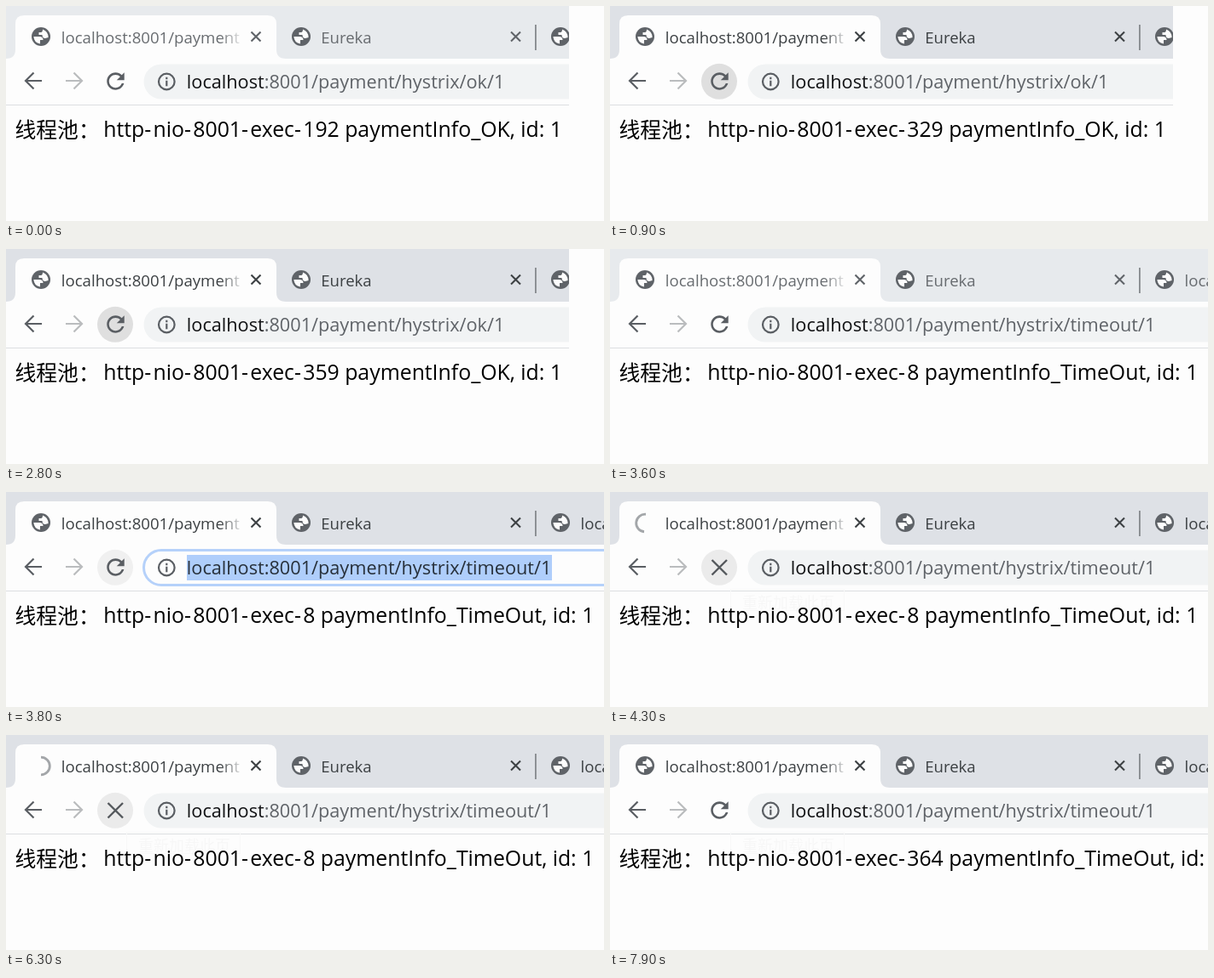
An HTML page that plays this animation: 701 by 253 pixels, repeating every 8000 ms.

```html
<!DOCTYPE html>
<html lang="zh-CN">
<head>
<meta charset="utf-8">
<title>Thread pool demo</title>
<style>
  html, body { margin: 0; width: 100%; height: 100%; overflow: hidden; background: #fdfdfd; }
  svg { display: block; width: 701px; height: 253px; }
  text { font-family: "Open Sans", "Noto Sans", sans-serif; white-space: pre; }
  .tab { font-size: 18.6px; }
  .url { font-size: 21.7px; }
  .body { font-size: 24.8px; fill: #000; }
  .cjk { font-family: "Noto Sans CJK SC", "Noto Sans CJK", sans-serif; }
  .dash { letter-spacing: 2.3px; }
  .line { fill: none; stroke: #5a5e63; stroke-width: 2.2; }
</style>
</head>
<body>
<svg viewBox="0 0 701 253">
  <defs>
    <g id="globe">
      <circle r="11" fill="#5f6368"/>
      <path fill="#fdfdfd" d="M-8.6 0H-2Q2.500 0 2.500 4H-1V8.500Q-8 7.500 -8.600 0ZM2-8.400Q8.400-6 8.600 1L5 2Q1.500 2 1.500-2H-2.500V-5H0Q2-5 2-8.400Z"/>
    </g>
    <path id="close" fill="none" stroke-width="2.1" d="M-5.500-5.500 5.500 5.500M5.500-5.500-5.500 5.500"/>
    <linearGradient id="fade">
      <stop offset="0" stop-color="#fdfdfd" stop-opacity="0"/>
      <stop offset="1" stop-color="#fdfdfd"/>
    </linearGradient>
  </defs>

  <rect width="701" height="253" fill="#fdfdfd"/>
  <rect id="strip" width="701" height="62"/>
  <path fill="#fdfdfd" d="M0 62Q11 62 11 51V21Q11 11 21 11H307Q317 11 317 21V51Q317 62 328 62Z"/>

  <use id="favicon" href="#globe" x="41" y="36"/>
  <path id="spinner" fill="none" stroke="#a3a6a9" stroke-width="2.8"/>
  <g id="titles">
    <text class="tab" x="64.8" y="44">localhost:8001/payment</text>
    <rect x="250" y="22" width="30" height="32" fill="url(#fade)"/>
    <text class="tab" x="369.2" y="44">Eureka</text>
    <text class="tab" x="673.5" y="44">localhost</text>
  </g>
  <g id="crosses">
    <use href="#close" x="293" y="36"/>
    <use href="#close" x="597.5" y="36"/>
  </g>
  <use href="#globe" x="346" y="36"/>
  <rect x="620" y="22" width="1.8" height="30" fill="#85898d"/>
  <use href="#globe" x="650" y="36"/>

  <path class="line" d="M42 88H23.5M32.5 78.5 23 88 32.5 97.5"/>
  <path class="line" style="stroke:#babcbe" d="M70 88H88.5M79.5 78.5 89 88 79.5 97.5"/>
  <circle id="hover" cx="128" cy="88.8" r="21"/>
  <path id="reload" transform="translate(113.1 73.2) scale(1.28)" d="M17.65 6.35C16.2 4.9 14.21 4 12 4c-4.42 0-7.99 3.58-7.99 8s3.57 8 7.99 8c3.73 0 6.84-2.55 7.73-6h-2.08c-.82 2.33-3.04 4-5.65 4-3.31 0-6-2.69-6-6s2.69-6 6-6c1.66 0 3.14.69 4.22 1.78L13 11h7V4l-2.35 2.35z"/>
  <path id="stop" fill="none" stroke-width="2.4" d="M119.500 80 137 97.500M137 80 119.500 97.500"/>

  <rect id="omnibox" x="161.500" y="68.500" width="600" height="41" rx="20.500" stroke-width="3"/>
  <rect id="selection" x="212" y="74" width="428" height="30" fill="#afcefb"/>
  <circle class="line" cx="188.300" cy="89" r="9.300"/>
  <path class="line" d="M188.300 87.700V94.200M188.300 83.700V86.200"/>
  <text class="url" x="211.800" y="97"><tspan id="host">localhost</tspan><tspan id="path"></tspan></text>
  <rect y="116" width="701" height="1" fill="#dcdee1"/>

  <g id="ghost">
    <rect x="141.500" y="114.500" width="133" height="25" fill="none" stroke="#f8f8f8"/>
    <text class="cjk" x="155" y="137" font-size="18" fill="#f7f7f7">重新加载此页</text>
  </g>

  <text class="body cjk" x="10.500" y="154.500">线程池：</text>
  <text class="body" id="info" x="114.300" y="154"></text>
  <rect id="edge" x="660" width="41" height="253" fill="#fdfdfd"/>
</svg>

<script>
const LOOP = 8000, SPIN = 1320;
const $ = id => document.getElementById(id);
const set = (id, attrs) => {
  for (const key in attrs) $(id).setAttribute(key, attrs[key]);
};
const show = (id, on) => set(id, { visibility: on ? "visible" : "hidden" });

// Counter-clockwise half ring whose leading end starts at 12 o'clock.
function arc(turn) {
  const point = a => `${41 - 10.3 * Math.sin(a)} ${36.5 - 10.3 * Math.cos(a)}`;
  const lead = turn * 2 * Math.PI;
  return `M${point(lead - Math.PI)}A10.3 10.3 0 0 0 ${point(lead)}`;
}

function threadId(t) {
  if (t < 700) return 192;
  if (t >= 3200) return t < 6500 ? 8 : 364;
  const i = Math.min(21, (t - 700) / 100);
  return 165 + (33 * i + 98) % 199;
}

function hoverColor(t) {
  if (t < 700 || t >= 3200 && t < 3800 || t >= 7000) return "none";
  if (t < 3200) return Math.min(21, (t - 700) / 100) % 5 < 3 ? "#dfdfdf" : "#ececec";
  if (t < 4000) return "#f0f0f0";
  return t < 6900 ? "#ebebeb" : "#f4f4f4";
}

let lastText = "";
function draw(ms) {
  const t = Math.floor(ms / 100) * 100;
  const slow = t >= 3200;
  const blurred = t < 700 || slow && t < 3800;
  const focused = t >= 3800 && t < 4000;
  const loading = t >= 4000 && t < 6500;
  const stopping = t >= 4000 && t < 7700;

  set("strip", { fill: blurred ? "#e7eaed" : "#dee1e6" });
  set("titles", { fill: blurred ? "#686c70" : "#3c4043" });
  set("crosses", { stroke: blurred ? "#5f6368" : "#3c4043" });
  show("favicon", !loading);
  show("spinner", loading);
  set("spinner", { d: arc((t - 6300) / SPIN) });

  set("hover", { fill: hoverColor(t) });
  show("reload", !stopping);
  set("reload", { fill: t >= 7700 && t < 7900 ? "#babcbe" : "#5a5e63" });
  show("stop", stopping);
  set("stop", { stroke: t < 6900 ? "#54585c" : "#babcbe" });

  set("omnibox", { fill: focused ? "#fdfdfd" : "#f1f3f4", stroke: focused ? "#b5d1fa" : "none" });
  show("selection", focused);
  set("host", { fill: focused ? "#27303a" : "#111214" });
  set("path", { fill: focused ? "#27303a" : "#5f6368" });
  $("path").textContent = `:8001/payment/hystrix/${slow ? "timeout" : "ok"}/1`;

  show("ghost", t >= 4000);
  show("edge", !slow);
  const text = `http-nio-8001-exec-${threadId(t)} paymentInfo_${slow ? "TimeOut" : "OK"}, id: 1`;
  if (text !== lastText) {
    $("info").innerHTML = text.replace(/-/g, '<tspan class="dash">-</tspan>');
    lastText = text;
  }
}

const start = performance.now();
function tick() {
  draw((performance.now() - start) % LOOP);
  requestAnimationFrame(tick);
}
tick();
</script>
</body>
</html>
```
